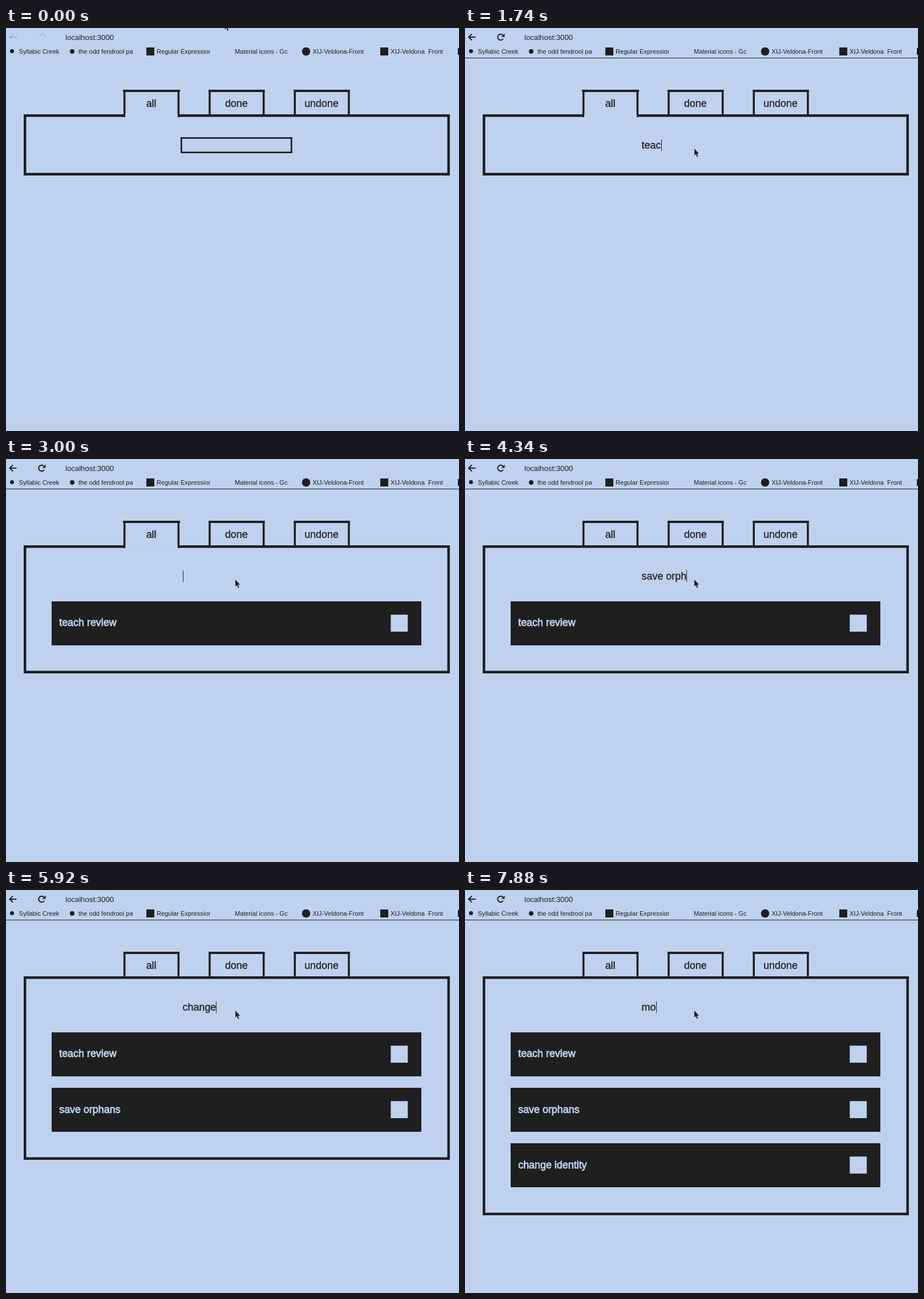
These frames come from a looping animation (794x705 px, 8 s). An HTML page with a canvas:

```html
<!DOCTYPE html>
<html lang="en">
<head>
<meta charset="utf-8">
<title>Todo list</title>
<style>
  html, body { margin: 0; width: 100%; height: 100%; overflow: hidden; background: #bed2ef; }
  canvas { display: block; }
</style>
</head>
<body>
<canvas id="stage" width="794" height="705"></canvas>
<script>
const ctx = document.getElementById('stage').getContext('2d');
const LOOP = 8000;
const BG = '#bed2ef', INK = '#1f1f1f';
const SANS = '"Liberation Sans", Arial, sans-serif';
const BODY = '17.9px ' + SANS;

// Each task: bursts of typing [first key, last key, letters], then the moment it is added
const tasks = [
  { text: 'teach review', bursts: [[1440, 1880, 6], [2040, 2080, 2], [2280, 2560, 4]], added: 3000 },
  { text: 'save orphans', bursts: [[3500, 3500, 1], [3640, 3800, 3], [3940, 4420, 6], [4560, 4560, 1], [4700, 4700, 1]], added: 4940 },
  { text: 'change identity', bursts: [[5500, 6160, 9], [6300, 6560, 4], [6740, 6860, 2]], added: 7040 },
  { text: 'mo', bursts: [[7800, 7880, 2]], added: Infinity }
];
const caretOff = [[5420, 5500], [7520, 7800]];

const bookmarks = [
  ['Syllabic Creek', 22.5, 95],
  ['the odd fendrool pages', 127, 222],
  ['Regular Expressions', 264, 358],
  ['Material icons - Gc', 401, 495],
  ['XIJ-Veldona-Front', 537.5, 632],
  ['XIJ-Veldona  Front', 674, 770]
];

const clamp = v => Math.max(0, Math.min(1, v));
const ease = p => p * p * (3 - 2 * p);
const mix = (a, b, p) => a + (b - a) * p;

function rect(x, y, w, h, color = INK) {
  ctx.fillStyle = color;
  ctx.fillRect(x, y, w, h);
}

function frame(x, y, w, h, b) {
  rect(x, y, w, b);
  rect(x, y + h - b, w, b);
  rect(x, y, b, h);
  rect(x + w - b, y, b, h);
}

function disc(x, y, r) {
  ctx.fillStyle = INK;
  ctx.beginPath();
  ctx.arc(x, y, r, 0, 7);
  ctx.fill();
}

// A thin outline in the text colour gives the slightly heavy look
function label(str, x, y, { font = BODY, color = INK, align = 'left', weight = 0.3 } = {}) {
  ctx.font = font;
  ctx.fillStyle = ctx.strokeStyle = color;
  ctx.textAlign = align;
  ctx.lineWidth = weight;
  ctx.fillText(str, x, y);
  if (weight) ctx.strokeText(str, x, y);
}

function path(points) {
  ctx.beginPath();
  points.forEach(([x, y]) => ctx.lineTo(x, y));
}

function toolbar(t) {
  const ready = t >= 700;
  ctx.save();
  ctx.strokeStyle = INK;
  ctx.lineWidth = ready ? 2 : 0.8;
  if (!ready) ctx.setLineDash([2, 3]);
  path([[12, 10.5], [6.5, 16], [12, 21.5]]);
  ctx.stroke();
  path([[6.5, 16], [18.5, 16]]);
  ctx.stroke();
  ctx.beginPath();
  if (ready) ctx.arc(62.5, 16, 5.2, 0.55, 5.5);
  else ctx.arc(64, 16, 5.5, 3.6, 5.8);
  ctx.stroke();
  ctx.restore();
  if (ready) {
    ctx.fillStyle = INK;
    path([[69.5, 9.5], [69.5, 15.5], [63.5, 15.5]]);
    ctx.fill();
    rect(0, 52, 794, 1);
  }

  label('localhost:3000', 104, 20.5, { font: '13.2px ' + SANS, weight: 0 });
  for (const [name, x, end] of bookmarks) {
    ctx.save();
    ctx.beginPath();
    ctx.rect(x, 32, end - x, 18);
    ctx.clip();
    label(name, x, 45, { font: '11.1px ' + SANS, weight: 0 });
    ctx.restore();
  }
  disc(10.5, 40.5, 3.5);
  disc(116, 41, 4);
  rect(246, 34, 14, 14);
  disc(526, 41, 7.3);
  rect(656, 34, 14, 14);
  rect(792, 35, 2, 12);
}

function tabs(t) {
  ['all', 'done', 'undone'].forEach((name, i) => {
    const x = 205.9 + 149.3 * i;
    rect(x, 108, 98.2, 4);
    rect(x, 108, 3.5, 46);
    rect(x + 94.7, 108, 3.5, 46);
    label(name, 254.6 + 149.2 * i, 137.5, { align: 'center' });
  });
  // The active tab stays open until the first task is added
  const open = 1 - clamp((t - 3000) / 220);
  if (open > 0) {
    ctx.globalAlpha = open;
    rect(209, 151, 92, 5, BG);
    rect(205, 108, 100, 4);
    rect(206, 151, 3, 5);
    rect(301, 151, 3, 5);
    ctx.globalAlpha = 1;
  }
}

function list(t) {
  const done = tasks.filter(task => t >= task.added);
  const bottom = 258 + 97 * done.length + (done.length ? 20 : 0);
  frame(31, 151, 747, bottom - 151, 4.5);
  done.forEach((task, i) => {
    const y = 249 + 97 * i;
    rect(80, y, 648, 77);
    rect(674.4, y + 23.3, 29.8, 29.8, BG);
    label(task.text, 93.2, Math.round(292 + 97.5 * i), { color: BG, weight: 0.8 });
  });
}

function typedCount(bursts, t) {
  let count = 0;
  for (const [start, end, n] of bursts) {
    const gap = n > 1 ? (end - start) / (n - 1) : 1;
    if (t >= start) count += Math.min(n, Math.floor((t - start) / gap + 1e-6) + 1);
  }
  return count;
}

function input(t) {
  const border = t < 1040 ? 1 : 1 - clamp((t - 1000) / 200);
  if (border > 0) {
    ctx.globalAlpha = border;
    frame(306, 191, 195.6, 28, 2.7);
    ctx.globalAlpha = 1;
  }
  if (t < 1040) return;
  const task = tasks.find(item => t < item.added);
  const typed = task.text.slice(0, typedCount(task.bursts, t));
  label(typed, 309.6, 211);
  if (!caretOff.some(([from, to]) => t >= from && t < to)) {
    rect(Math.round(309.7 + ctx.measureText(typed).width), 195, 1, 20);
  }
}

function pointer(t) {
  const down = t < 240 ? 0 : ease(clamp((t - 220) / 320));
  const back = t < 700 ? 0 : ease(clamp((t - 670) / 230));
  const x = mix(mix(383.5, 431, down), 402, back);
  const y = mix(mix(-9.5, 214, down), 211, back);
  ctx.save();
  ctx.translate(x, y);
  path([[0, 0], [0, 12], [2.7, 9.6], [4.8, 14.6], [6.6, 13.8], [4.6, 9], [8, 8.7]]);
  ctx.closePath();
  ctx.strokeStyle = BG;
  ctx.lineWidth = 1.6;
  ctx.stroke();
  ctx.fillStyle = INK;
  ctx.fill();
  ctx.restore();
}

function draw(t) {
  rect(0, 0, 794, 705, BG);
  toolbar(t);
  list(t);
  tabs(t);
  input(t);
  pointer(t);
}

const began = performance.now();
function tick() {
  draw((performance.now() - began) % LOOP);
  requestAnimationFrame(tick);
}
tick();
</script>
</body>
</html>
```
